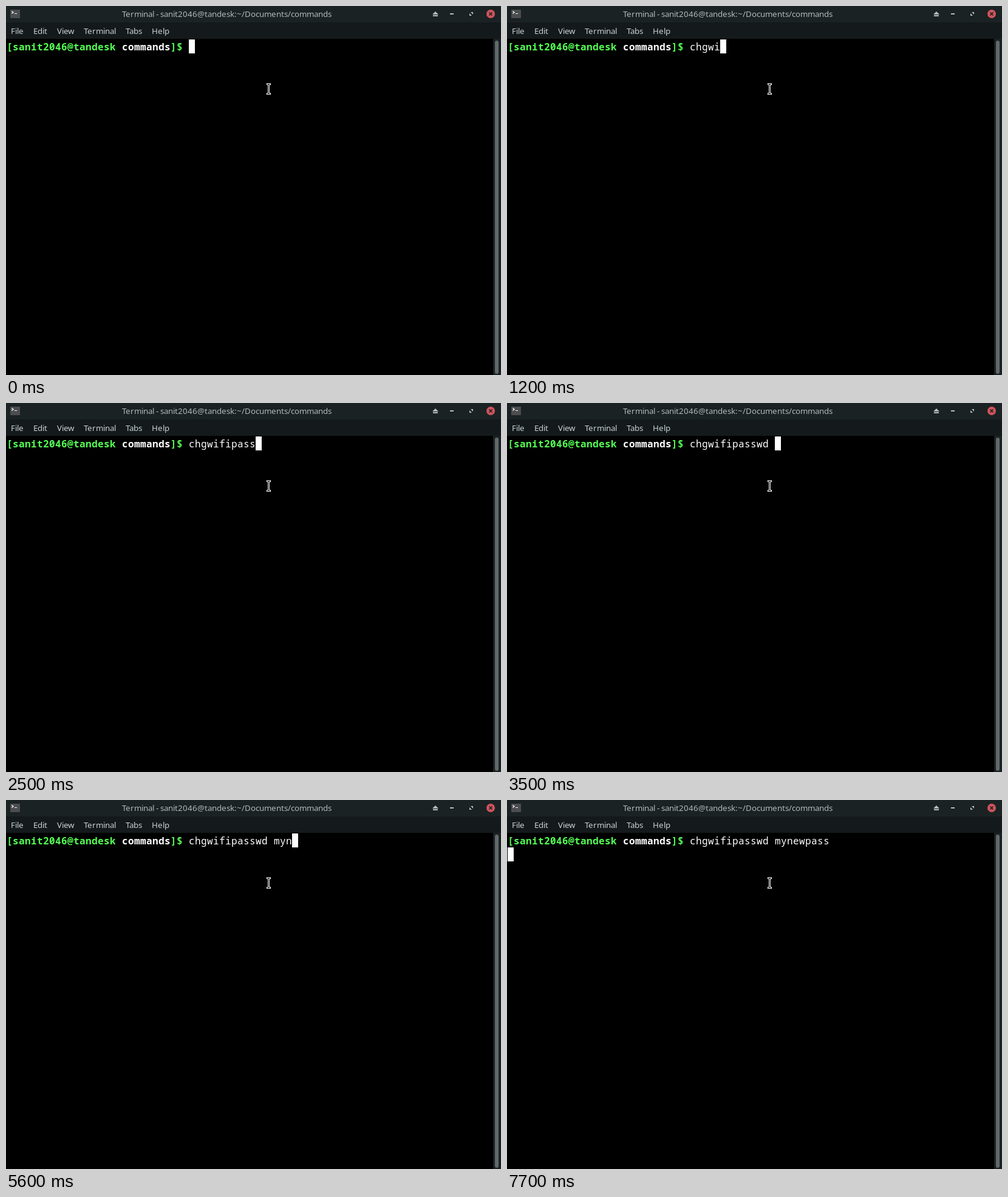
Animation, 815 px wide and 607 px high, one loop 8 s. Source, as an HTML page with a canvas:

```html
<!DOCTYPE html>
<html lang="en">
<head>
<meta charset="utf-8">
<title>Terminal</title>
<style>
  html, body { margin: 0; height: 100%; overflow: hidden; background: #000; }
  canvas { display: block; }
</style>
</head>
<body>
<canvas id="stage" width="815" height="607"></canvas>
<script>
const ctx = document.getElementById('stage').getContext('2d');

const LOOP = 8000;
const CELL = { x: 1, y: 55, width: 10, height: 23, baseline: 18 };
const USER = 'sanit2046@tandesk';
const COMMAND = 'chgwifipasswd mynewpass';
// One time per typed character; equal times appear together.
const KEY_TIMES = [
  300, 500, 600, 1000, 1200, 1400, 1500, 2100, 2300, 2400, 2500, 3500, 3500, 3500,
  4900, 5000, 5600, 5700, 5900, 6300, 6400, 6800, 7100
];
const ENTER_TIME = 7700;

const UI_FONT = '13.333px "Noto Sans", sans-serif';
const MONO_FONT = '16px "Noto Sans Mono", monospace';
const MENU = [['File', 8], ['Edit', 45], ['View', 84], ['Terminal', 128], ['Tabs', 197], ['Help', 240]];

function rect(x, y, width, height, color) {
  ctx.fillStyle = color;
  ctx.fillRect(x, y, width, height);
}

function shape(path, color) {
  ctx.fillStyle = color;
  ctx.fill(new Path2D(path));
}

function line(path, color, width) {
  ctx.strokeStyle = color;
  ctx.lineWidth = width;
  ctx.stroke(new Path2D(path));
}

// Sets text on whole pixels, keeping pair kerning; returns the end position.
function text(string, x, baseline, font, color) {
  const widthOf = s => ctx.measureText(s).width;
  ctx.font = font;
  ctx.fillStyle = color;
  [...string].forEach((char, i) => {
    const next = string[i + 1] || '';
    ctx.fillText(char, x, baseline);
    x += Math.round(next === ' ' ? widthOf(char) : widthOf(char + next) - widthOf(next));
  });
  return x;
}

function drawTitleBar() {
  rect(0, 0, 815, 27, '#1b2224');
  rect(7, 6, 16, 14, '#4b4d4e');
  line('M9.5 8.5 L12 10.5 L9.5 12.5', '#fff', 1.3);
  rect(14, 12, 4, 1, '#fff');
  text(`Terminal - ${USER}:~/Documents/commands`, 191, 18, UI_FONT, '#afb8ba');

  const icon = '#b5bdbf';
  shape('M702 14 L707 9 L712 14 Z', icon);
  rect(703, 15, 8, 2, icon);
  rect(731, 12, 6, 2, icon);
  shape('M765 10 H769 V14 Z M763 12 V16 H767 Z', icon);
  shape('M791 13 a7 7 0 1 0 14 0 a7 7 0 1 0 -14 0 Z', '#d0545c');
  line('M795.5 10.5 l5 5 m0 -5 l-5 5', '#1b2224', 1.7);
}

function drawMenuBar() {
  rect(0, 27, 815, 27, '#141a1b');
  for (const [label, x] of MENU) text(label, x, 46, UI_FONT, '#c9d1d2');
}

function drawScrollbar() {
  rect(802, 54, 13, 553, '#1b2224');
  ctx.fillStyle = '#62696b';
  ctx.beginPath();
  ctx.roundRect(805, 57, 6, 548, 3);
  ctx.fill();
}

function drawPointer() {
  rect(429, 127, 7, 3, '#fff');
  rect(429, 143, 7, 3, '#fff');
  rect(431, 127, 3, 19, '#fff');
  rect(430, 128, 5, 1, '#000');
  rect(430, 144, 5, 1, '#000');
  rect(432, 128, 1, 17, '#000');
}

function drawTerminal(time) {
  const typed = KEY_TIMES.filter(key => key <= time).length;
  const baseline = CELL.y + CELL.baseline;
  const bold = 'bold ' + MONO_FONT;
  const green = '#54ff54';

  let x = text(`[${USER} `, CELL.x, baseline, bold, green);
  x = text('commands', x, baseline, bold, '#fff');
  x = text(']$ ', x, baseline, bold, green);
  text(COMMAND.slice(0, typed), x, baseline, MONO_FONT, '#fff');

  const entered = time >= ENTER_TIME;
  const caretX = entered ? CELL.x : x + typed * CELL.width;
  const caretY = CELL.y + (entered ? CELL.height : 0);
  rect(caretX, caretY, CELL.width, CELL.height, '#fff');
}

function draw(now) {
  rect(0, 0, 815, 607, '#000');
  drawTitleBar();
  drawMenuBar();
  drawScrollbar();
  drawTerminal(now % LOOP);
  drawPointer();
  requestAnimationFrame(draw);
}

draw(0);
</script>
</body>
</html>
```
